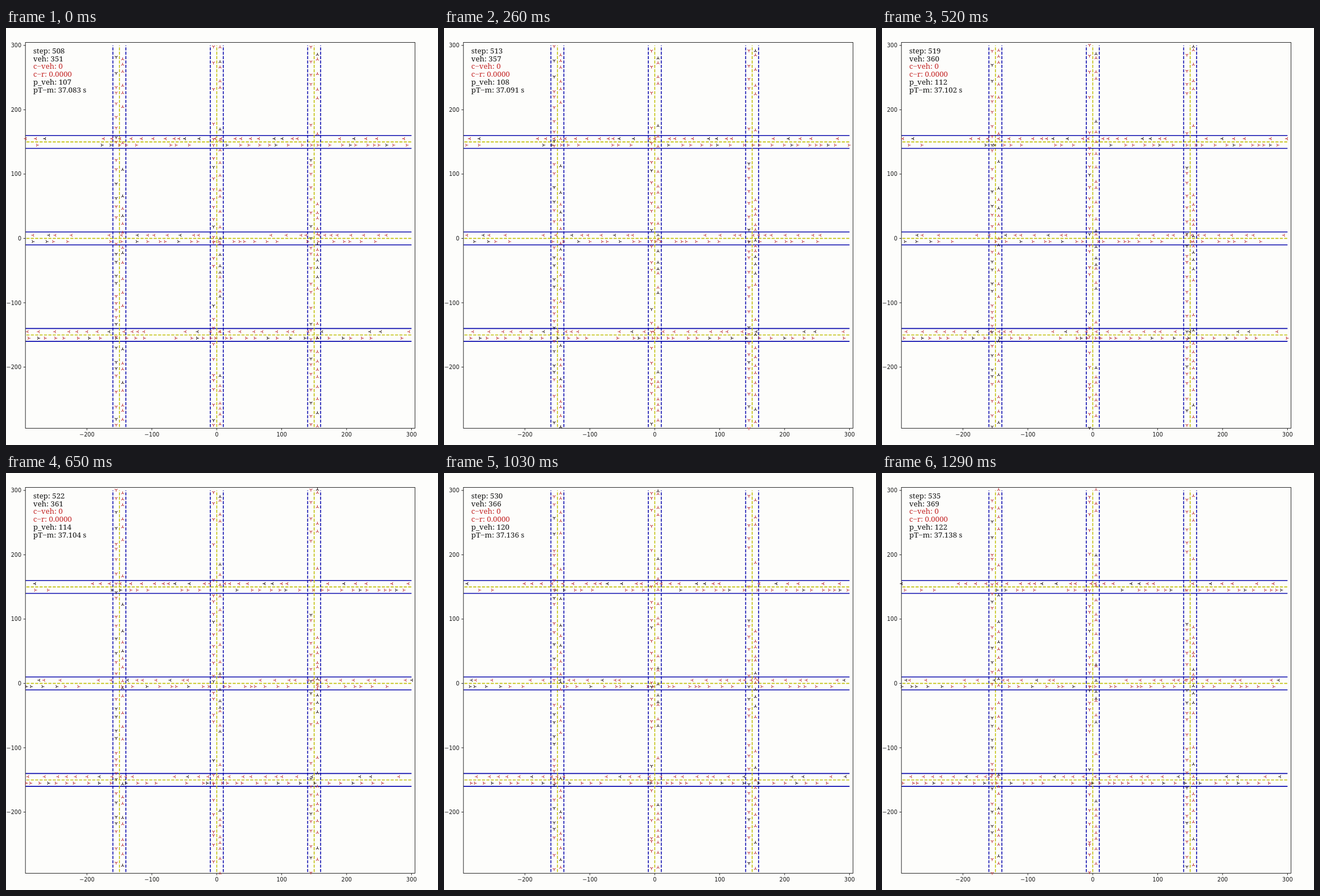
An HTML page with a canvas that plays this animation: 761 px wide and 736 px high, repeating every 1420 ms.

```html
<!DOCTYPE html>
<html lang="en">
<head>
<meta charset="utf-8">
<title>Traffic grid</title>
<style>
  html, body { margin: 0; width: 100%; height: 100%; overflow: hidden; background: #fdfdfb; }
  canvas { display: block; }
</style>
</head>
<body>
<canvas id="stage" width="761" height="736"></canvas>
<script>
const ctx = document.getElementById('stage').getContext('2d');
const PAPER = '#fdfdfb', INK = '#151515', BLUE = '#0c0cae', YELLOW = '#c2c212';
const RED = '#bf3b40', DARK = '#2b1b20', ALERT = '#c42a2a';
const LOOP = 1420, FIRST = 508, SPAN = 27;
const BOX = { left: 34.2, top: 25.5, right: 720.5, bottom: 706.5 };
const ROADS = [-150, 0, 150];
const px = x => 371.3 + x * 1.1435;
const py = y => 371.4 - y * 1.1355;

// Read-outs at a few ticks; the ticks between are interpolated
const KEYS = [0, 1, 3, 5, 7, 9, 10];
const VEH = [351, 354, 359, 361, 365, 366, 369];
const PASSED = [107, 107, 109, 114, 118, 121, 122];
const MEAN_TIME = [37.083, 37.083, 37.099, 37.104, 37.127, 37.145, 37.138];

function keyed(values, tick) {
  const i = Math.max(1, KEYS.findIndex(k => k >= tick));
  const u = (tick - KEYS[i - 1]) / (KEYS[i] - KEYS[i - 1]);
  return values[i - 1] + (values[i] - values[i - 1]) * u;
}

function seeded(seed) {
  return () => {
    seed = (seed + 0x6d2b79f5) | 0;
    let t = Math.imul(seed ^ (seed >>> 15), 1 | seed);
    t = (t + Math.imul(t ^ (t >>> 7), 61 | t)) ^ t;
    return ((t ^ (t >>> 14)) >>> 0) / 4294967296;
  };
}

// Fill a lane with cars at random gaps, leaving its empty stretches free
function lane(axis, road, dir, ...empty) {
  const across = axis === 'x';
  const at = across ? py(road + (dir < 0 ? 5 : -5)) : px(road + (dir > 0 ? -5 : 5));
  const angle = (across ? 0 : Math.PI / 2) + (dir < 0 ? Math.PI : 0);
  const random = seeded(road + dir * 7 + (across ? 1000 : 2000));
  const cars = [];
  for (let p = -12; p < 752; p += 8 + 21 * random()) {
    const hole = empty.find(([a, b]) => p > a && p < b);
    if (hole) p = hole[1];
    cars.push({ from: p, travel: 33 + 7.5 * random() });
  }
  return { across, dir, at, angle, cars };
}

const lanes = [
  lane('x', 150, -1, [70, 172], [533, 588], [658, 701]),
  lane('x', 150, 1, [72, 169], [235, 290], [325, 389]),
  lane('x', 0, -1, [118, 182], [343, 467], [682, 723]),
  lane('x', 0, 1, [132, 184], [488, 531], [657, 720]),
  lane('x', -150, -1, [264, 316], [562, 641], [665, 710]),
  lane('x', -150, 1, [245, 299], [655, 697]),
  lane('y', -150, 1, [204, 233], [336, 381]),
  lane('y', -150, -1, [144, 203], [212, 250], [253, 297], [505, 567]),
  lane('y', 0, 1, [65, 108], [112, 169], [434, 490]),
  lane('y', 0, -1, [109, 179], [482, 536], [539, 614]),
  lane('y', 150, 1, [119, 171], [174, 233]),
  lane('y', 150, -1, [145, 187], [190, 311], [470, 522])
];

function line(x1, y1, x2, y2, color, width, dash = []) {
  ctx.strokeStyle = color;
  ctx.lineWidth = width;
  ctx.setLineDash(dash);
  ctx.beginPath();
  ctx.moveTo(x1, y1);
  ctx.lineTo(x2, y2);
  ctx.stroke();
}

function label(value, x, y, align) {
  ctx.textAlign = align;
  ctx.fillText(String(value).replace('-', '\u2212'), x, y);
}

function drawRoads() {
  const dash = [5.4, 2.33], width = 1.6;
  ctx.save();
  ctx.beginPath();
  ctx.rect(BOX.left, BOX.top, BOX.right - BOX.left, BOX.bottom - BOX.top);
  ctx.clip();
  const across = (y, color, dashes) => line(px(-300), py(y), px(300), py(y), color, width, dashes);
  const upright = x => line(px(x), py(-300), px(x), py(300), x % 50 ? BLUE : YELLOW, width, dash);
  for (const c of ROADS) {
    across(c - 10, BLUE);
    across(c + 10, BLUE);
    across(c, YELLOW, dash);
    [c - 10, c, c + 10].forEach(upright);
  }
  ctx.restore();
}

function drawAxes() {
  ctx.setLineDash([]);
  ctx.strokeStyle = INK;
  ctx.lineWidth = 0.9;
  ctx.strokeRect(BOX.left, BOX.top, BOX.right - BOX.left, BOX.bottom - BOX.top);
  ctx.fillStyle = INK;
  ctx.font = '9.7px "DejaVu Sans", sans-serif';
  for (let v = -200; v <= 300; v += 100) {
    line(BOX.left - 3.5, py(v), BOX.left, py(v), INK, 0.9);
    line(px(v), BOX.bottom, px(v), BOX.bottom + 3.5, INK, 0.9);
    label(v, 27.2, py(v) + 3.6, 'right');
    label(v, px(v), 721, 'center');
  }
}

// Three-armed marker with its stem pointing along the heading
function drawCar(x, y, angle, color) {
  ctx.save();
  ctx.translate(x, y);
  ctx.rotate(angle);
  ctx.strokeStyle = color;
  ctx.lineWidth = 1.05;
  ctx.beginPath();
  for (const [ax, ay] of [[3, 0], [-1.6, 2.5], [-1.6, -2.5]]) {
    ctx.moveTo(0, 0);
    ctx.lineTo(ax, ay);
  }
  ctx.stroke();
  ctx.restore();
}

function drawCars(part) {
  ctx.setLineDash([]);
  for (const { across, dir, at, angle, cars } of lanes) {
    const [min, max] = across ? [34, 716] : [29, 707];
    for (const { from, travel } of cars) {
      const p = from + dir * travel * part;
      if (p < min || p > max) continue;
      const color = travel < 34.5 ? DARK : RED; // slow cars are dark
      drawCar(across ? p : at, across ? at : p, angle, color);
    }
  }
}

function drawStats(tick, step) {
  const rows = [
    'step: ' + step,
    'veh: ' + Math.round(keyed(VEH, tick)),
    'c\u2212veh: 0',
    'c\u2212r: 0.0000',
    'p_veh: ' + Math.round(keyed(PASSED, tick)),
    'pT\u2212m: ' + keyed(MEAN_TIME, tick).toFixed(3) + ' s'
  ];
  ctx.font = '13.3px "Noto Serif", serif';
  ctx.textAlign = 'left';
  rows.forEach((text, i) => {
    ctx.fillStyle = i === 2 || i === 3 ? ALERT : INK;
    ctx.fillText(text, 48, 44.8 + i * 13.75);
  });
}

function draw(ms) {
  const t = ms % LOOP;
  const tick = t < 770 ? Math.floor(t / 130) : 6 + Math.floor((t - 770) / 130);
  const step = Math.round(FIRST + tick * SPAN / 10);
  ctx.fillStyle = PAPER;
  ctx.fillRect(0, 0, 761, 736);
  drawRoads();
  drawAxes();
  drawCars((step - FIRST) / SPAN);
  drawStats(tick, step);
}

const start = performance.now();
function loop() {
  draw(performance.now() - start);
  requestAnimationFrame(loop);
}
loop();
</script>
</body>
</html>
```
